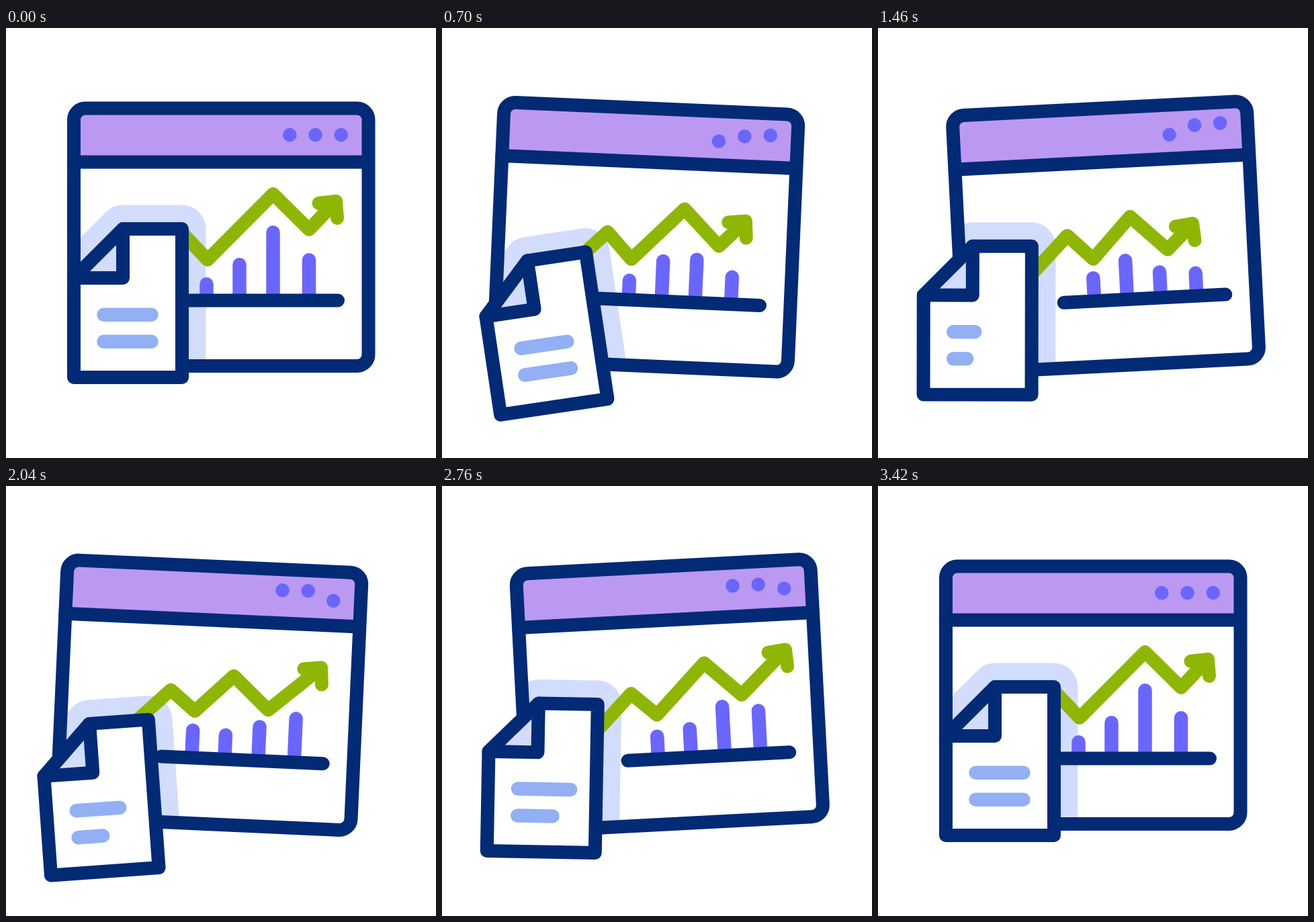
An HTML page with a canvas for the animation above (3600 ms loop, 640 px wide and 640 px high).

```html
<!DOCTYPE html>
<html lang="en">
<head>
<meta charset="utf-8">
<title>Report chart</title>
<style>
html, body { margin: 0; width: 100%; height: 100%; overflow: hidden; background: #fff; }
canvas { display: block; }
</style>
</head>
<body>
<canvas width="640" height="640"></canvas>
<script>
const g = document.querySelector('canvas').getContext('2d');
const LOOP = 3600, START = 220, END = 3420;
const NAVY = '#032a75', LILAC = '#bb99f2', VIOLET = '#6a66fb';
const HALO = '#d2dcfd', SKY = '#93b0f4', GREEN = '#90b605', WHITE = '#fff';

let t = 0;

const ease = p => (1 - Math.cos(Math.PI * p)) / 2;
const mix = (a, b, p) => a + (b - a) * ease(p);

// Eases from 0 through evenly spaced stops and back to 0.
function swing(stops, first, step, start = START) {
  if (t <= start || t >= END) return 0;
  if (t < first) return mix(0, stops[0], (t - start) / (first - start));
  const i = Math.min(Math.floor((t - first) / step), stops.length - 1);
  const from = first + i * step;
  const isLast = i === stops.length - 1;
  return mix(stops[i], isLast ? 0 : stops[i + 1], (t - from) / (isLast ? END - from : step));
}

const rock = (a, b, first, step) => swing([a, b, a, b], first, step);
const drift = (a, b) => swing([a, b], 1120, 1080);
const reach = (a, b) => swing([a, b], 1180, 1260);
const retype = (a, b) => swing([a, b], 1480, 920, 600);

function trace(points, closed) {
  g.beginPath();
  points.forEach(([x, y]) => g.lineTo(x, y));
  if (closed) g.closePath();
}

function stroke(points, color, width = 20, closed = false) {
  trace(points, closed);
  g.strokeStyle = color;
  g.lineWidth = width;
  g.stroke();
}

function fill(points, color) {
  trace(points, true);
  g.fillStyle = color;
  g.fill();
}

// Moves a part by (dx, dy) and turns it about its own centre.
function pose(cx, cy, dx, dy, degrees) {
  g.setTransform(1, 0, 0, 1, cx + dx, cy + dy);
  g.rotate(degrees * Math.PI / 180);
  g.translate(-cx, -cy);
}

const poseWindow = () =>
  pose(320, 311, rock(-18, 19, 800, 630), 0, rock(3, -3, 880, 635));

const poseSheet = () => pose(181.5, 409.5,
  rock(-44, -32, 980, 610), rock(58, 24, 920, 630), rock(-14, 7, 1070, 640));

const SHEET = [[174, 299], [262, 299], [262, 520], [101, 520], [101, 372]];
const FOLD = [[174, 299], [174, 372], [101, 372]];

function drawFrame() {
  g.fillStyle = LILAC;
  g.fillRect(105, 124, 430, 75);
  g.strokeStyle = NAVY;
  g.lineWidth = 20;
  g.beginPath();
  g.roundRect(101, 119.5, 438.5, 383.5, 17);
  g.stroke();
  stroke([[101, 199.5], [539, 199.5]], NAVY);

  g.fillStyle = VIOLET;
  [drift(9, -9.5), drift(-7, -9.5), drift(-12.7, 4.5)].forEach((dy, i) => {
    g.beginPath();
    g.arc(422.3 + 38.2 * i, 159 + dy, 10.3, 0, 7);
    g.fill();
  });
}

function drawBar(x, height) {
  stroke([[x, 415.7 - height], [x, 403]], VIOLET, 20.5);
}

function drawChart() {
  drawBar(298.5, 34.5 + drift(8, 17));
  drawBar(347.5, 63.5 + drift(11.5, -19));
  drawBar(397.5, 111.5 + drift(-67, -50));
  drawBar(451, 70.5 + drift(-36, 7));
  stroke([[253, 405.5], [494, 405.5]], NAVY);

  const slide = drift(-39, -42);
  const x = 491 + reach(-47, 6), y = 258 + reach(46, -7);
  stroke([
    [190, 378], [263, 306],
    [300, 345 + drift(0, -9.5)],
    [397.5 + slide, 247 + drift(36, 34)],
    [451 + slide, 300 + drift(36, 29)],
    [x, y]
  ], GREEN);
  stroke([[x - 25.5, y + 2.8], [x, y], [x + 2, y + 25]], GREEN);
}

function drawSheet() {
  fill([...SHEET.slice(1), [174, 372], [174, 299]], WHITE);
  fill(FOLD, HALO);
  stroke(SHEET, NAVY, 20, true);
  stroke(FOLD, NAVY);
  [retype(-39, 10), retype(-51, -26)].forEach((dx, i) => {
    const y = 426.7 + 40 * i;
    stroke([[145.5, y], [216.5 + dx, y]], SKY, 20.5);
  });
}

function draw(now) {
  t = now % LOOP;
  g.resetTransform();
  g.fillStyle = WHITE;
  g.fillRect(0, 0, 640, 640);
  g.lineCap = g.lineJoin = 'round';

  // The sheet's halo shows only inside the window pane.
  g.save();
  poseWindow();
  g.beginPath();
  g.rect(106, 205, 429, 293);
  g.clip();
  poseSheet();
  stroke(SHEET, HALO, 71, true);
  g.restore();

  poseWindow();
  drawFrame();
  drawChart();
  poseSheet();
  drawSheet();
  requestAnimationFrame(draw);
}
requestAnimationFrame(draw);
</script>
</body>
</html>
```
